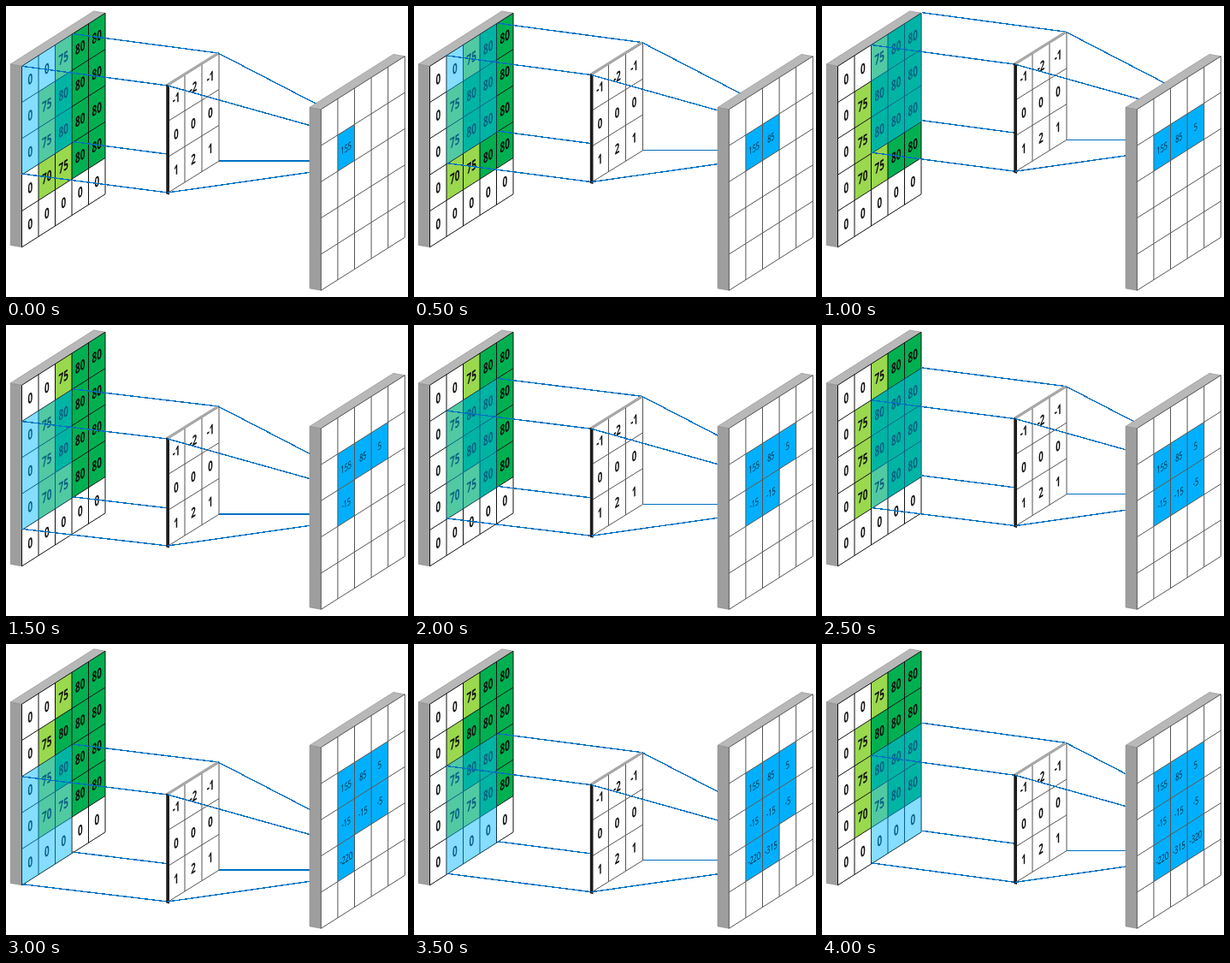
Animation of 470x340 px, one loop 4.5 s. Source, as an HTML page:

```html
<!DOCTYPE html>
<html lang="en">
<head>
<meta charset="utf-8">
<title>Convolution step by step</title>
<style>
  html, body { margin: 0; width: 100%; height: 100%; overflow: hidden; background: #fff; }
  svg { display: block; width: 470px; height: 340px; }
  text { font-family: "Open Sans", "Noto Sans", sans-serif; text-anchor: middle; fill: #111; }
  .input text { font-size: 16.5px; font-weight: 700; }
  .kernel text { font-size: 16px; font-weight: 700; }
  .output text { font-size: 12px; fill: #0b2233; }
  .grid { fill: none; stroke: #111; stroke-width: 1; }
  .kernel .grid, .output .grid { stroke: #555; }
  .rays { fill: none; stroke: #0070c0; stroke-width: 1.4; shape-rendering: crispEdges; }
</style>
</head>
<body>
<svg id="stage" viewBox="0 0 470 340"></svg>
<script>
const STEP = 500;
const INPUT = [[0, 0, 75, 80, 80], [0, 75, 80, 80, 80], [0, 75, 80, 80, 80], [0, 70, 75, 80, 80], [0, 0, 0, 0, 0]];
const KERNEL = [[-1, -2, -1], [0, 0, 0], [1, 2, 1]];
const RESULT = [[155, 85, 5], [-15, -15, -5], [-220, -315, -320]];
const TINT = { 0: '#fff', 70: '#9ad84e', 75: '#9ad84e', 80: '#00b050' };

// Kernel path: start of each pass and its climb per column
const KERNEL_LEFT = 189, KERNEL_STRIDE = 18.5;
const PASSES = [{ y: 93, climb: 12.4 }, { y: 133, climb: 11.7 }, { y: 176, climb: 11.3 }];

const stage = document.getElementById('stage');

function add(parent, tag, attrs = {}) {
  const node = document.createElementNS('http://www.w3.org/2000/svg', tag);
  for (const key in attrs) node.setAttribute(key, attrs[key]);
  parent.append(node);
  return node;
}

// A sheared plane: columns climb to the right, rows go straight down.
function plane(x, y, w, rise, h) {
  const at = (col, row) => [x + col * w, y - col * rise + row * h];
  const area = (col, row, cols = 1, rows = cols) =>
    'M' + [at(col, row), at(col + cols, row), at(col + cols, row + rows), at(col, row + rows)].join('L') + 'Z';
  return { at, area, slope: -rise / w };
}

function drawGrid(parent, p, n) {
  let d = '';
  for (let i = 0; i <= n; i++) {
    d += `M${p.at(i, 0)}L${p.at(i, n)}M${p.at(0, i)}L${p.at(n, i)}`;
  }
  add(parent, 'path', { class: 'grid', d });
}

function drawNumber(parent, p, col, row, value, drop) {
  const [x, y] = p.at(col + 0.5, row + 0.5);
  const label = add(parent, 'text', { y: drop, transform: `matrix(.6 ${0.6 * p.slope} 0 1 ${x} ${y})` });
  label.textContent = value;
  return label;
}

function drawSlab(parent, p, n) {
  const [tl, tr, bl] = [p.at(0, 0), p.at(n, 0), p.at(0, n)];
  const back = ([x, y]) => [x - 13.3, y - 2.4];
  const edge = { stroke: '#888', 'stroke-width': 0.6, 'stroke-linejoin': 'round' };
  add(parent, 'path', { d: 'M' + [back(tl), tl, bl, back(bl)].join('L') + 'Z', fill: '#9e9e9e', ...edge });
  add(parent, 'path', { d: 'M' + [back(tl), back(tr), tr, tl].join('L') + 'Z', fill: '#b8b8b8', ...edge });
  add(parent, 'path', { d: p.area(0, 0, n), fill: '#fff' });
}

function eachCell(table, visit) {
  table.forEach((line, row) => line.forEach((value, col) => visit(value, col, row)));
}

// Input panel
const inPlane = plane(18.5, 70.3, 19.5, 12.4, 42.3);
const input = add(stage, 'g', { class: 'input' });
drawSlab(input, inPlane, 5);
eachCell(INPUT, (value, col, row) =>
  add(input, 'path', { d: inPlane.area(col, row), fill: TINT[value] }));
drawGrid(input, inPlane, 5);
eachCell(INPUT, (value, col, row) => drawNumber(input, inPlane, col, row, value, 6));
const patch = add(stage, 'path', { fill: 'rgb(0,184,255)', 'fill-opacity': 0.48 });

const raysIn = add(stage, 'path', { class: 'rays' });

// Kernel, drawn around its own top left corner
const kPlane = plane(0, 0, 20, 12.4, 41.8);
const kernel = add(stage, 'g', { class: 'kernel' });
add(kernel, 'path', { d: kPlane.area(0, 0, 3), fill: '#fff' });
drawGrid(kernel, kPlane, 3);
add(kernel, 'path', { d: 'M-2-1.5L58-39L61-37.5L1 .5Z', fill: '#a8a8a8' });
add(kernel, 'path', { d: 'M-1.7-1.5L2 0V127.5L-1.7 126.5Z', fill: '#1c1c1c' });
eachCell(KERNEL, (value, col, row) => drawNumber(kernel, kPlane, col, row, value, 5.7));

const raysOut = add(stage, 'path', { class: 'rays' });

// Output panel, hiding the far ends of the rays
const outPlane = plane(368.3, 120.8, 19.6, 12.4, 42.3);
const output = add(stage, 'g', { class: 'output' });
drawSlab(output, outPlane, 5);
const results = [];
eachCell(RESULT, (value, col, row) =>
  results.push([add(output, 'path', { d: outPlane.area(col + 1, row + 1), fill: '#00b0ff' })]));
drawGrid(output, outPlane, 5);
eachCell(RESULT, (value, col, row) =>
  results[row * 3 + col].push(drawNumber(output, outPlane, col + 1, row + 1, value, 4.7)));

// For each corner: offset in the window, offset on the kernel, slope and reach beyond it
const RAYS = [
  { from: [0, 0], via: [0, 0], slope: 0.28, reach: 180 },
  { from: [59.5, -37.8], via: [59, -38], slope: 0.517, reach: 130 },
  { from: [0, 125.7], via: [0, 125], slope: -0.142, reach: 180 },
  { from: [59.5, 88.2], via: [60, 88], slope: 0, reach: 130 }
];

function show(step) {
  const col = step % 3, row = Math.floor(step / 3);
  const { y, climb } = PASSES[row];
  const kx = KERNEL_LEFT + col * KERNEL_STRIDE, ky = y - col * climb;
  const [wx, wy] = inPlane.at(col, row);
  patch.setAttribute('d', inPlane.area(col, row, 3));
  kernel.setAttribute('transform', `translate(${kx} ${ky})`);
  raysIn.setAttribute('d', RAYS.map(({ from, via }) =>
    `M${wx + from[0]} ${wy + from[1]}L${kx + via[0]} ${ky + via[1]}`).join(''));
  raysOut.setAttribute('d', RAYS.map(({ via, slope, reach }) =>
    `M${kx + via[0]} ${ky + via[1]}l${reach} ${reach * slope}`).join(''));
  results.forEach((parts, i) =>
    parts.forEach(part => part.setAttribute('visibility', i <= step ? 'visible' : 'hidden')));
}

let shown = -1;
const start = performance.now();
function tick() {
  const step = Math.floor((performance.now() - start) / STEP) % 9;
  if (step !== shown) show(shown = step);
  requestAnimationFrame(tick);
}
tick();
</script>
</body>
</html>
```
